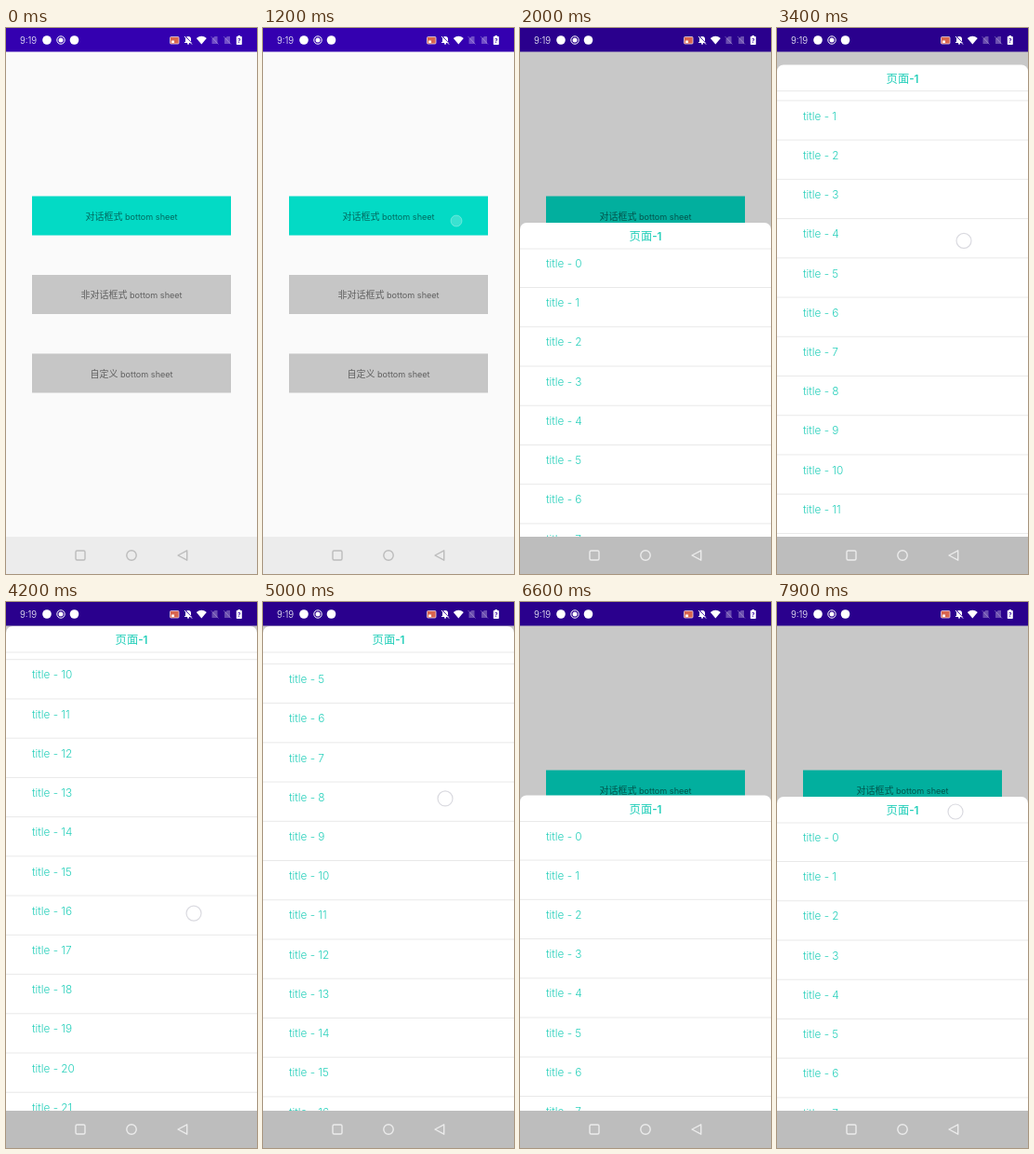
Write an HTML page with a canvas that moves like this. It is 270 px wide and 586 px high and loops after 8 s.

```html
<!DOCTYPE html>
<html lang="zh">
<head>
<meta charset="utf-8">
<title>Bottom sheet</title>
<style>
  html, body { margin: 0; width: 100%; height: 100%; overflow: hidden; background: #fafafa; }
  canvas { display: block; width: 270px; height: 586px; }
</style>
</head>
<body>
<canvas id="stage"></canvas>
<script>
const W = 270, H = 586, LOOP = 8000, TICK = 100;
const STATUS_H = 25.5, NAV_Y = 546, HEADER_H = 28, ROW_H = 42.23, ROWS = 25;
const HIDDEN = H, COLLAPSED = 209, EXPANDED = 26;
const SCROLL_END = 563, SCROLL_MID = 250;
const TEAL = '#03dac5', INK = '#24cfba', LINE = '#e9e9e9';
const LATIN = 'Inter, sans-serif';
const CJK = '"Noto Sans CJK SC", "Noto Sans CJK", sans-serif';

const canvas = document.getElementById('stage');
const ctx = canvas.getContext('2d');
const dpr = window.devicePixelRatio || 1;
canvas.width = W * dpr;
canvas.height = H * dpr;

// Each swipe holds the content at "grab" pixels below the top of the list.
const touches = [
  { from: 700, to: 1300, x: 208, grab: 207 - HIDDEN, soft: true },
  { from: 3200, to: 3500, x: 205, grab: 220, drift: -0.02 },
  { from: 3900, to: 4300, x: 208, grab: 722, drift: -0.02 },
  { from: 4800, to: 5200, x: 200, grab: 383, drift: -0.02 },
  { from: 5800, to: 6400, x: 177, grab: 165, drift: -0.02 },
  { from: 7700, to: LOOP, x: 192, grab: 225 - COLLAPSED }
];

// Smooth progress from 0 to 1 that begins at start and lasts dur.
function ease(t, start, dur) {
  const u = Math.min(1, Math.max(0, (t - start) / dur));
  return u * u * (3 - 2 * u);
}

function sheetTop(t) {
  return HIDDEN
    + (COLLAPSED - HIDDEN) * ease(t, 1250, 450)
    + (EXPANDED - COLLAPSED) * ease(t, 3150, 300)
    + (COLLAPSED - EXPANDED) * ease(t, 5875, 765);
}

function scrollOffset(t) {
  return SCROLL_END * ease(t, 3350, 350)
    + (SCROLL_MID - SCROLL_END) * ease(t, 3800, 826)
    - SCROLL_MID * ease(t, 4750, 852);
}

function rect(x, y, w, h, color) {
  ctx.fillStyle = color;
  ctx.fillRect(x, y, w, h);
}

function roundRect(x, y, w, h, r, fill, stroke, width) {
  ctx.beginPath();
  ctx.roundRect(x, y, w, h, r);
  paint(fill, stroke, width);
}

function circle(x, y, r, fill, stroke, width) {
  ctx.beginPath();
  ctx.arc(x, y, r, 0, Math.PI * 2);
  paint(fill, stroke, width);
}

function poly(points, fill, stroke, width) {
  ctx.beginPath();
  points.forEach(([x, y]) => ctx.lineTo(x, y));
  ctx.closePath();
  paint(fill, stroke, width);
}

function paint(fill, stroke, width = 1) {
  if (fill) { ctx.fillStyle = fill; ctx.fill(); }
  if (stroke) { ctx.strokeStyle = stroke; ctx.lineWidth = width; ctx.stroke(); }
}

function text(str, x, y, font, color) {
  ctx.font = font;
  ctx.fillStyle = color;
  ctx.fillText(str, x, y);
}

// Centres a Chinese run followed by a Latin run on one baseline.
function mixedText(cjk, latin, y, cjkFont, latinFont, color) {
  ctx.font = cjkFont;
  const cjkWidth = ctx.measureText(cjk).width;
  ctx.font = latinFont;
  const x = (W - cjkWidth - ctx.measureText(latin).width) / 2;
  text(cjk, x, y, cjkFont, color);
  text(latin, x + cjkWidth, y, latinFont, color);
}

function drawPage(dim) {
  rect(0, 0, W, H, '#fafafa');
  rect(0, 0, W, STATUS_H, '#3400b0');
  ['对话框式', '非对话框式', '自定义'].forEach((label, i) => {
    const y = 180.5 + i * 84.5;
    rect(28, y, 214, 42, i ? '#c6c6c6' : TEAL);
    mixedText(label, ' bottom sheet', y + 25, '10px ' + CJK, '9.1px ' + LATIN, 'rgba(0,0,0,0.52)');
  });
  rect(0, 0, W, H, `rgba(0,0,0,${dim})`);
}

function drawSheet(top, scroll) {
  ctx.save();
  ctx.beginPath();
  ctx.rect(0, STATUS_H, W, NAV_Y - STATUS_H);
  ctx.clip();
  roundRect(0, top, W, H, 7, '#fff');
  mixedText('页面', '-1', top + 19, '500 12.3px ' + CJK, '600 11.5px ' + LATIN, INK);

  const listTop = top + HEADER_H;
  rect(0, listTop - 0.5, W, 1, LINE);
  ctx.beginPath();
  ctx.rect(0, listTop, W, H);
  ctx.clip();
  for (let i = 0; i < ROWS; i++) {
    const y = listTop + i * ROW_H - scroll;
    text('title - ' + i, 28, y + 20, '300 11.8px ' + LATIN, INK);
    rect(0, y + ROW_H - 1.2, W, 1, LINE);
  }
  ctx.restore();
}

function slash(x, color) {
  ctx.beginPath();
  ctx.moveTo(x - 4, 9);
  ctx.lineTo(x + 4, 17.5);
  paint(null, color);
}

function drawBellOff(x) {
  roundRect(x - 3, 9, 6, 6.5, [3, 3, 0, 0], '#fff');
  rect(x - 4, 15, 8, 1, '#fff');
  circle(x, 16.8, 1, '#fff');
  slash(x + 1, '#2f00a0');
  slash(x, '#fff');
}

function drawWifi(x) {
  ctx.beginPath();
  ctx.moveTo(x, 17.5);
  ctx.lineTo(x - 5.5, 11);
  ctx.quadraticCurveTo(x, 6.6, x + 5.5, 11);
  paint('#fff');
}

function drawSimOff(x) {
  const color = 'rgba(255,255,255,0.3)';
  poly([[x - 3, 17], [x - 3, 11.5], [x, 9], [x + 3, 9], [x + 3, 17]], color);
  slash(x, color);
}

function drawStatus() {
  text('9:19', 15, 16.5, '300 9.7px ' + LATIN, '#fff');
  circle(44, 13, 4.8, '#fff');
  circle(59, 13, 4.2, null, '#fff');
  circle(59, 13, 2.5, '#fff');
  circle(73.5, 13, 4.8, '#fff');

  roundRect(176.5, 9.5, 9.5, 7.5, 1, '#d9654f', '#e8d8e4', 0.8);
  rect(178, 13.5, 3, 2.5, '#fff');
  drawBellOff(196);
  drawWifi(210.3);
  drawSimOff(224.5);
  drawSimOff(238);

  rect(249.5, 8, 2.5, 2, '#fff');
  roundRect(247.8, 9, 6, 9, 0.8, '#fff');
  text('?', 248.9, 16, '600 6.5px ' + LATIN, '#3000a4');
}

function drawNav(dim) {
  rect(0, NAV_Y, W, H - NAV_Y, '#ececec');
  rect(0, NAV_Y, W, H - NAV_Y, `rgba(0,0,0,${dim})`);
  const color = dim > 0.1 ? '#ebebeb' : '#bcbcbc';
  ctx.lineJoin = 'round';
  roundRect(75, 561, 10, 10, 1.5, null, color, 1.4);
  circle(135, 566, 5.2, null, color, 1.4);
  poly([[185, 566], [194.7, 560.8], [194.7, 571.2]], null, color, 1.4);
}

function drawTouch(t, contentTop) {
  const touch = touches.find(p => t >= p.from && t < p.to);
  if (!touch) return;
  const x = touch.x + (touch.drift || 0) * (t - touch.from);
  const y = touch.grab + contentTop;
  if (touch.soft) circle(x, y, 6, 'rgba(255,255,255,0.22)', 'rgba(255,255,255,0.3)');
  else circle(x, y, 8, 'rgba(255,255,255,0.6)', '#dadae0', 1.2);
}

function render(t) {
  const dim = 0.2 * ease(t, 1200, 300);
  const top = sheetTop(t), scroll = scrollOffset(t);
  ctx.setTransform(dpr, 0, 0, dpr, 0, 0);
  drawPage(dim);
  drawSheet(top, scroll);
  drawStatus();
  drawNav(dim);
  drawTouch(t, top - scroll);
}

const start = performance.now();
function loop() {
  const t = (performance.now() - start) % LOOP;
  render(Math.floor(t / TICK) * TICK);
  requestAnimationFrame(loop);
}
loop();
</script>
</body>
</html>
```
